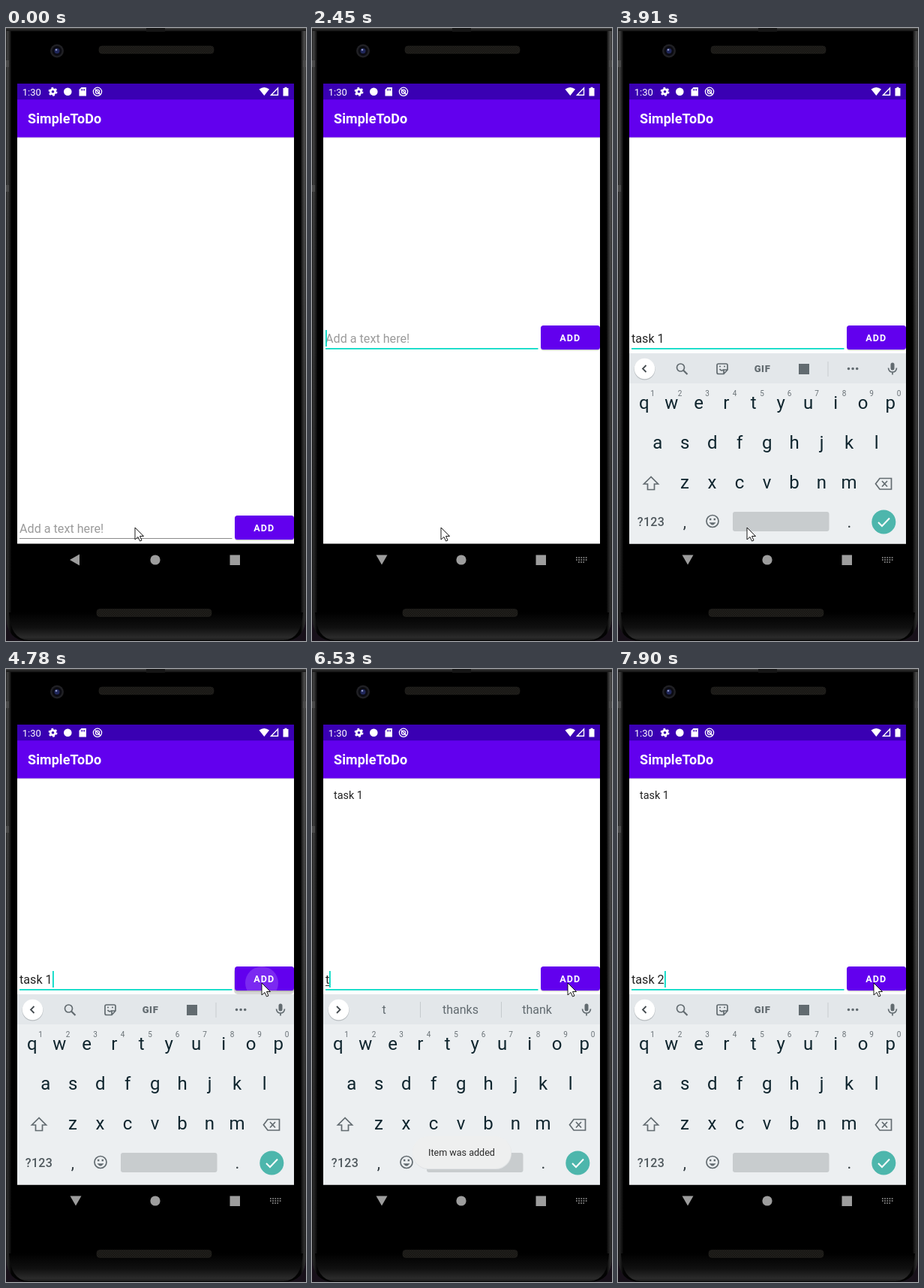
An HTML page for the animation above (8000 ms loop, 400 by 816 pixels).

```html
<!DOCTYPE html>
<html lang="en">
<head>
<meta charset="utf-8">
<title>To-do app demo</title>
<style>
  html, body { margin: 0; width: 100%; height: 100%; overflow: hidden; background: #000; }
  svg { display: block; width: 400px; height: 816px; font-family: Roboto, sans-serif; }
  text { white-space: pre; }
  .mid { text-anchor: middle; }
  .icon { fill: none; stroke: #626b70; stroke-width: 1.7; }
</style>
</head>
<body>
<svg viewBox="0 0 400 816">
  <defs>
    <linearGradient id="side">
      <stop offset="0" stop-color="#1d1d1d"/><stop offset=".005" stop-color="#444"/>
      <stop offset=".01" stop-color="#2c2c2c"/><stop offset=".018" stop-color="#050505"/>
      <stop offset=".982" stop-color="#050505"/><stop offset=".988" stop-color="#2c2c2c"/>
      <stop offset=".995" stop-color="#505050"/><stop offset="1" stop-color="#303030"/>
    </linearGradient>
    <linearGradient id="shade" x2="0" y2="1">
      <stop offset=".2" stop-color="#000" stop-opacity="0"/><stop offset="1" stop-color="#000" stop-opacity=".45"/>
    </linearGradient>
    <linearGradient id="chin" x2="0" y2="1">
      <stop offset="0" stop-color="#000"/><stop offset=".55" stop-color="#101010"/>
      <stop offset=".9" stop-color="#2b2b2b"/><stop offset="1" stop-color="#1b1b1b"/>
    </linearGradient>
    <pattern id="mesh" width="3" height="3" patternUnits="userSpaceOnUse">
      <path d="M0 0H3V3H0Z" fill="#23211e"/><path d="M0 0H1.5V1.5H0ZM1.5 1.5H3V3H1.5Z" fill="#151411"/>
    </pattern>
    <clipPath id="buttonClip"><rect x="305" y="396" width="79" height="32" rx="3.5"/></clipPath>
  </defs>

  <!-- Phone body -->
  <path d="M0 0H400V816H0Z" fill="#171019"/>
  <path id="body" d="M0 0H400V782Q399 816 370 816H30Q1 816 0 782Z" fill="url(#side)"/>
  <path d="M0 0H400V782Q399 816 370 816H30Q1 816 0 782Z" fill="url(#shade)"/>
  <path d="M7 5H393V783H7Z"/>
  <path d="M4 778H396Q394 814 370 815H30Q6 814 4 778Z" fill="url(#chin)"/>
  <path d="M0 0H400V4H0Z" fill="#1d1d1d"/><path d="M0 0H400V1.500H0Z" fill="#3c3c3c"/>
  <path d="M187 0H212V5H187Z" fill="#161616"/>
  <path d="M0 43H4V52H0ZM396 43H400V52H396ZM0 209H4V218H0Z" fill="#4a4a4a"/>
  <circle cx="68" cy="30.500" r="9" fill="#202024"/><circle cx="68" cy="30.500" r="6.500" fill="#0b0b12"/>
  <circle cx="68" cy="30.500" r="3.500" fill="#20275b"/><circle cx="67" cy="29" r="1.300" fill="#8f97c5"/>
  <g fill="url(#mesh)" stroke="#24231f" stroke-width=".6">
    <rect x="124" y="24" width="153" height="10" rx="4"/><rect x="121" y="773.500" width="153" height="10" rx="4"/>
  </g>

  <!-- App -->
  <path d="M15 74H384V686.600H15Z" fill="#fff"/>
  <path d="M15 145H384V146.500H15Z" fill="#d8d3e2"/>
  <path d="M15 95H384V145.400H15Z" fill="#6200ee"/><path d="M15 74H384V95.200H15Z" fill="#3a00b3"/>
  <g fill="#fff">
    <text x="21.700" y="89.500" font-size="13">1:30</text>
    <circle cx="62.500" cy="84.800" r="3.200" fill="none" stroke="#fff" stroke-width="2.800"/>
    <circle cx="62.500" cy="84.800" r="5" fill="none" stroke="#fff" stroke-width="2" stroke-dasharray="2.600 2.636"/>
    <circle cx="82.300" cy="84.800" r="5.300"/>
    <path d="M100.500 79H107V90.500H97.500V82Z"/>
    <path d="M100.500 81V83.500M102.500 81V83.500M104.500 81V83.500" stroke="#3a00b3"/>
    <g fill="none" stroke="#fff" stroke-width="1.300">
      <circle cx="122" cy="84.800" r="5.600"/><circle cx="122" cy="84.800" r="2.600"/><path d="M119 81.500L126 88.700"/>
    </g>
    <path d="M337.500 81.500Q344.300 76.500 351 81.500L344.300 90Z"/>
    <path d="M353.500 89.300H362.500V80Z" fill="none" stroke="#fff" stroke-width="1.400"/>
    <path d="M369.500 80H371.500V78.700H374.500V80H376.500V90.500H369.500Z"/>
    <text x="29" y="127" font-size="18" font-weight="600" letter-spacing=".08">SimpleToDo</text>
  </g>
  <text id="item" x="29" y="172.500" font-size="14.370" fill="#222">task 1</text>

  <g id="row">
    <path id="underline"/>
    <text id="entry" x="18" y="419" font-size="16.160"></text>
    <path id="composing" stroke="#333"/>
    <path id="caret" d="M0 402h1.800v22h-1.800z" fill="#03dac5"/>
    <rect x="305" y="397" width="79" height="32.500" rx="4" fill="#000" opacity=".17"/>
    <rect id="lift" x="304" y="398" width="80" height="35" rx="5" fill="#000"/>
    <rect x="305" y="396" width="79" height="32" rx="3.500" fill="#6200ee"/>
    <circle id="ripple" cx="341" cy="418" fill="#fff" clip-path="url(#buttonClip)"/>
    <text x="330.300" y="417" font-size="12.570" font-weight="600" letter-spacing="1.050" fill="#fff">ADD</text>
  </g>

  <g id="keyboard">
    <path d="M15 433H384V686.600H15Z" fill="#eceff1"/><path d="M15 433H384V473H15Z" fill="#e3e7ea"/>
    <circle cx="35.500" cy="454.500" r="14" fill="#b9bec1"/><circle cx="35.500" cy="453.500" r="13.700" fill="#fff"/>
    <path id="chevron" fill="none" stroke="#444b4f" stroke-width="1.800"/>
    <g id="tools" class="icon">
      <circle cx="83.500" cy="452" r="5"/><path d="M87 455.500L92.500 461" stroke-width="2.200"/>
      <path d="M134 447H144Q146 447 146 449V455L141 460.500H134Q132 460.500 132 458.500V449Q132 447 134 447ZM146 455H141V460.500M135.500 454Q138 457.500 141 454.500"/>
      <path d="M135 450.500H137M141 450.500H143"/>
      <text class="mid" x="192.500" y="458" font-size="13" font-weight="900" letter-spacing=".6" fill="#626b70" stroke="none">GIF</text>
      <path d="M241 447H255V461H241Z" fill="#626b70" stroke="none"/>
      <path d="M280 444V464" stroke="#c8cdd0" stroke-width="1"/>
      <path d="M307.500 453.500H319.500" stroke-width="3.600" stroke-linecap="round" stroke-dasharray="0 5.600"/>
    </g>
    <g id="strip" fill="#626b70" font-size="16">
      <path d="M144.500 443V464M252.500 443V464" stroke="#c5cacd"/>
      <text class="mid" x="96" y="459"></text><text class="mid" x="198" y="459"></text><text class="mid" x="300" y="459"></text>
    </g>
    <rect x="363.500" y="445.500" width="5" height="10" rx="2.500" fill="#626b70"/>
    <path class="icon" d="M360.500 452.500Q361 458 366 458T371.500 452.500M366 458V461.500"/>
    <g id="letters" class="mid" font-size="24" fill="#0f252e"></g>
    <g id="digits" class="mid" font-size="10" fill="#697176"></g>
    <path class="icon" d="M44 597.500L34.500 607H39.500V614.500H48.500V607H53.500Z"/>
    <path class="icon" d="M349 599.500H364.500V614H349L343.500 606.800ZM352 603L359 610.500M359 603L352 610.500"/>
    <text class="mid" x="44" y="662.500" font-size="16" font-weight="500" letter-spacing=".3" fill="#50595e">?123</text>
    <g class="mid" font-size="22" fill="#333d42"><text x="89" y="665">,</text><text x="308.500" y="665">.</text></g>
    <g class="icon"><circle cx="126" cy="656.500" r="8"/><path d="M122 658.500Q126 664 130 658.500Z" fill="#626b70" stroke-width=".5"/>
      <path d="M122 654H124.400M127.600 654H130" stroke-width="2.300"/></g>
    <rect x="153" y="644" width="128.500" height="26" rx="3" fill="#c8ccce"/>
    <circle cx="354.300" cy="657.500" r="16" fill="#4db6ac"/>
    <path d="M347 658L352 663L362 652.500" fill="none" stroke="#fff" stroke-width="2"/>
  </g>

  <g id="toast">
    <rect x="134" y="623" width="132" height="43" rx="21" fill="#dfe2e4"/>
    <rect x="134" y="622" width="131.500" height="43" rx="21" fill="#eeefef"/>
    <text x="155" y="648" font-size="12.570" fill="#2b2b2b">Item was added</text>
  </g>

  <!-- Navigation -->
  <g fill="#9d9d9d">
    <path id="back" d="M85 708L98 700.500V715.500Z"/>
    <circle cx="199" cy="708" r="6.600"/><path d="M298.500 701.500H312V715H298.500Z"/>
    <path id="imeIcon" d="M352 705H366.500M352 708H366.500M355 711H363" fill="none" stroke="#9d9d9d" stroke-width="1.600" stroke-dasharray="1.700 1.500"/>
  </g>
  <path id="pointer" d="M0 0V16L4 12.500L6.500 18L9 17L6.500 11.500H11.500Z" fill="#fff" stroke="#000" stroke-width=".9"/>
</svg>

<script>
const LOOP = 8000;
const $ = id => document.getElementById(id);
const set = (id, attrs) => {
  for (const [name, value] of Object.entries(attrs)) $(id).setAttribute(name, value);
};

const keyRows = [["qwertyuiop", 34.7, 507], ["asdfghjkl", 52.7, 559.5], ["zxcvbnm", 89, 612.5]];
$("letters").innerHTML = keyRows.map(([keys, x, y]) =>
  [...keys].map((key, i) => `<text x="${x + i * 36.5}" y="${y}">${key}</text>`).join("")).join("");
$("digits").innerHTML = [..."1234567890"].map((digit, i) =>
  `<text x="${46 + i * 36.5}" y="489.5">${digit}</text>`).join("");

const initial = {
  focus: 0, caret: 0, raised: 0, turn: 0, ime: 0, keyboard: null, text: "", composing: 0,
  words: null, mouse: [172, 665], ripple: [0, 0], item: 0, toast: 0
};

// Each entry overrides part of the state from its time onwards.
const steps = [
  [310, { focus: 1, caret: 1 }],
  [920, { caret: 0 }],
  [1190, { turn: -30, ime: .4 }],
  [1310, { turn: -70, ime: .8 }],
  [1430, { turn: -90, ime: 1, caret: 1 }],
  [1860, { raised: 1, caret: 0 }],
  [2450, { caret: 1 }],
  [2570, { keyboard: 43, text: "t", composing: 1 }],
  [2690, { keyboard: 0, text: "tas" }],
  [2810, { text: "task" }],
  [3120, { words: ["task", "tasks", "taskbar"] }],
  [3240, { text: "task ", composing: 0, words: ["force", "is", "and"] }],
  [3380, { text: "task 1", words: null }],
  [3910, { caret: 0 }],
  [4030, { mouse: [186, 625] }],
  [4150, { mouse: [232, 500] }],
  [4270, { mouse: [290, 385] }],
  [4390, { mouse: [325, 349], caret: 1 }],
  [4510, { mouse: [338, 390] }],
  [4630, { mouse: [341, 418] }],
  [4780, { ripple: [22, .16] }],
  [4900, { ripple: [50, .2] }],
  [5020, { ripple: [90, .2] }],
  [5140, { ripple: [90, .1], text: "" }],
  [5300, { ripple: [0, 0] }],
  [5450, { item: 1, toast: .35 }],
  [5600, { toast: .8 }],
  [5720, { toast: 1, caret: 0 }],
  [6120, { caret: 1 }],
  [6530, { text: "t", composing: 1, words: ["t", "thanks", "thank"] }],
  [6830, { text: "ta", words: ["ta", "take", "talk"] }],
  [6950, { text: "tas", words: ["tas", "task", "tasks"] }],
  [7230, { text: "task", words: ["task", "tasks", "taskbar"], toast: .8 }],
  [7380, { toast: .45 }],
  [7510, { text: "task ", composing: 0, words: ["force", "is", "and"], toast: .15 }],
  [7630, { toast: 0 }],
  [7780, { text: "task 2", words: null }]
];

function draw(time) {
  const s = Object.assign({}, initial, ...steps.filter(([at]) => at <= time).map(([, change]) => change));

  set("row", { transform: `translate(0 ${s.raised ? 0 : 253})` });
  set("underline", s.focus
    ? { fill: "#03dac5", d: "M18 426H301.500V427.800H18Z" }
    : { fill: "#8a8a8a", d: "M18 426H301.500V427H18Z" });
  const entry = $("entry");
  entry.textContent = s.text || "Add a text here!";
  entry.setAttribute("fill", s.text ? "#222" : "#9b9b9b");
  const end = 18 + (s.text ? entry.getComputedTextLength() : 0);
  set("caret", { transform: `translate(${Math.round(end)} 0)`, opacity: s.caret });
  set("composing", { d: `M18 421.5H${end}`, opacity: s.composing && s.text ? 1 : 0 });
  set("ripple", { r: s.ripple[0], opacity: s.ripple[1] });
  set("lift", { opacity: s.ripple[1] });

  const open = s.keyboard !== null;
  set("keyboard", { display: open ? "inline" : "none", transform: `translate(0 ${s.keyboard || 0})` });
  set("tools", { display: s.words ? "none" : "inline" });
  set("strip", { display: s.words ? "inline" : "none" });
  set("chevron", { d: s.words ? "M33 449L37.5 453.5L33 458" : "M37.500 449L33 453.500L37.500 458" });
  $("strip").querySelectorAll("text").forEach((node, i) => node.textContent = s.words ? s.words[i] : "");

  set("item", { opacity: s.item });
  set("toast", { opacity: s.toast });
  set("back", { transform: `rotate(${s.turn} 92.3 707.3)` });
  set("imeIcon", { opacity: s.ime });
  set("pointer", { transform: `translate(${s.mouse})` });
}

const start = performance.now();
function tick() {
  draw((performance.now() - start) % LOOP);
  requestAnimationFrame(tick);
}
tick();
</script>
</body>
</html>
```
